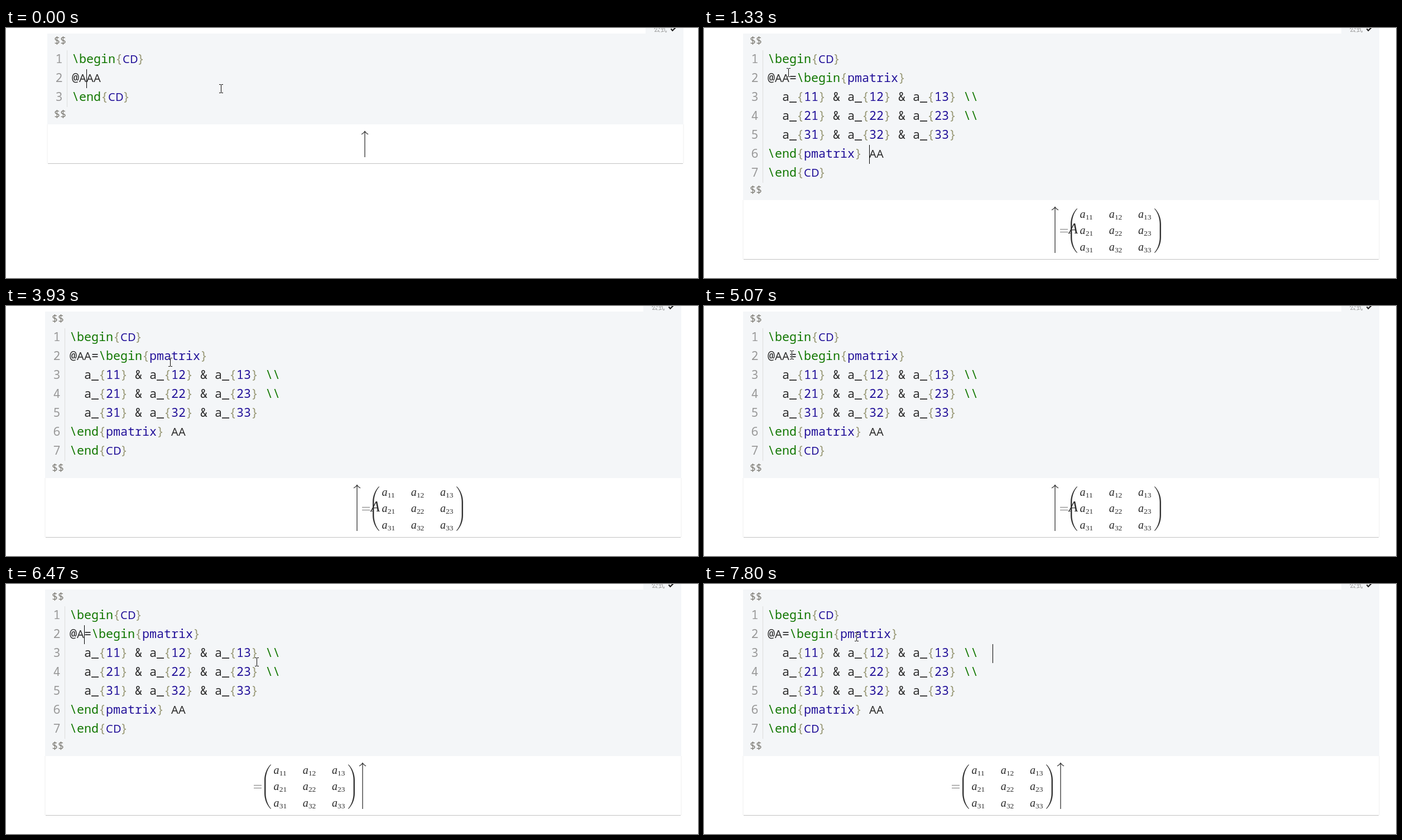
An HTML page that plays this animation: 1240x449 px, repeating every 7870 ms.

```html
<!DOCTYPE html>
<html lang="zh">
<head>
<meta charset="utf-8">
<title>Formula editor</title>
<style>
  html, body { margin: 0; width: 100%; height: 100%; overflow: hidden; background: #fff; }
  svg { display: block; }
  text { white-space: pre; fill: #2c2c2c; }
  .code { font: 21.667px "Noto Sans Mono", monospace; }
  .caps { font: 20px "Noto Sans", sans-serif; }
  .cmd { fill: #170; }
  .brace { fill: #997; }
  .arg { fill: #219; }
  .num { fill: #999; }
  .fence { font: 18.333px "Noto Sans Mono", monospace; fill: #7d7b74; }
  .tab { font: 12px "Noto Sans CJK SC", "Noto Sans CJK", sans-serif; fill: #999; }
  .var { font: italic 20px "Liberation Serif", serif; }
  .big { font: italic 27px "Liberation Serif", serif; }
  .sub { font: 13.4px "Liberation Serif", serif; }
  .line { fill: none; stroke: #333; stroke-width: 1.3; }
  #pointer { mix-blend-mode: difference; fill: #fff; }
</style>
</head>
<body>
<svg id="stage" width="1240" height="449" viewBox="0 0 1240 449"></svg>
<script>
const LOOP = 7870, TICK = 200 / 3, COL = 13, ROW = 34, LEFT = 114;
const stage = document.getElementById('stage');

function add(parent, tag, attrs, text) {
  const el = document.createElementNS('http://www.w3.org/2000/svg', tag);
  for (const key in attrs) el.setAttribute(key, attrs[key]);
  if (text) el.textContent = text;
  parent.append(el);
  return el;
}
const rect = (g, x, y, width, height, fill) => add(g, 'rect', { x, y, width, height, fill });
const label = (g, cls, x, y, text) => add(g, 'text', { class: cls, x, y }, text);

function codeLine(g, source, row) {
  const y = 63 + row * ROW;
  let col = 0, inside = false;
  label(g, 'code num', 84.5, y, String(row + 1));
  for (const token of source.match(/\\\\|\\[a-z]+|[{}]|[A-Z]+|[^\\{}A-Z]+/g)) {
    const isBrace = /[{}]/.test(token);
    if (isBrace) inside = token === '{';
    const color = isBrace ? 'brace' : token[0] === '\\' ? 'cmd' : inside ? 'arg' : '';
    const font = /[A-Z]/.test(token) ? 'caps' : 'code';
    const xs = [...token].map((_, i) => LEFT + (col + i) * COL);
    label(g, font + ' ' + color, xs.join(' '), y, token);
    col += token.length;
  }
}

function editor(shift, lines, previewHeight) {
  const g = add(stage, 'g', { transform: `translate(${shift})` });
  const split = 71 + lines.length * ROW, end = split + previewHeight;
  rect(g, 70, 10, 1140, split - 10, '#f4f6f8');
  rect(g, 1142, 0, 68, 10, '#f4f6f8');
  label(g, 'tab', 1156.5, 6.5, '公式');
  add(g, 'path', { d: 'M1187.5 1.5l2.8 3.2l6 -6', fill: 'none', stroke: '#222', 'stroke-width': 2.2 });
  label(g, 'fence', 82, 29, '$$');
  label(g, 'fence', 82, split - 12, '$$');
  rect(g, 105, 40, 1, lines.length * ROW, '#ddd');
  lines.forEach((line, i) => codeLine(g, line, i));
  rect(g, 69.5, split, 1, previewHeight, '#f0f0f0');
  rect(g, 1209.5, split, 1, previewHeight, '#f0f0f0');
  rect(g, 71, end, 1138, 1, '#c2c2c2');
  return g;
}

function arrow(g, x, top, bottom) {
  add(g, 'path', {
    class: 'line',
    d: `M${x} ${top + .5}V${bottom}M${x - 6} ${top + 6}Q${x - 2} ${top + 4} ${x} ${top + .5}Q${x + 2} ${top + 4} ${x + 6} ${top + 6}`
  });
}

function matrix(g, x) {
  const m = add(g, 'g', { transform: `translate(${x})` });
  const paren = 'M11.3 324C4 331 0 342 0 352V376C0 386 4 397 11.3 404' +
    'L12 403.3C6 397 2.4 386 2.4 376V352C2.4 342 6 331 12 324.7Z';
  add(m, 'path', { d: paren, fill: '#333' });
  add(m, 'path', { d: paren, fill: '#333', transform: 'translate(162) scale(-1 1)' });
  add(m, 'path', { d: 'M-19 361.5h14M-19 366.5h14', fill: 'none', stroke: '#777' });
  for (let r = 0; r < 3; r++) for (let c = 0; c < 3; c++) {
    const cx = 16.5 + c * 52.2, cy = 340.5 + r * 29.7;
    label(m, 'var', cx, cy, 'a');
    label(m, 'sub', cx + 10.2, cy + 3, `${r + 1}${c + 1}`);
  }
}

const withMatrix = head => [
  '\\begin{CD}', head + '=\\begin{pmatrix}',
  ...[1, 2, 3].map(r => '  ' + [1, 2, 3].map(c => `a_{${r}${c}}`).join(' & ') + (r < 3 ? ' \\\\' : '')),
  '\\end{pmatrix} AA', '\\end{CD}'
];

rect(stage, 0, 0, 1240, 449, '#fff');
const scenes = [
  editor(4, ['\\begin{CD}', '@AAA', '\\end{CD}'], 70),
  editor(0, withMatrix('@AA'), 106),
  editor(0, withMatrix('@A'), 106)
];
arrow(scenes[0], 639, 185, 232);
arrow(scenes[1], 629, 321, 404);
matrix(scenes[1], 657);
label(scenes[1], 'big', 653.5, 369, 'A');
matrix(scenes[2], 463);
arrow(scenes[2], 639, 321, 404);

const caret = rect(stage, 0, 0, 1, ROW, '#000');
const pointer = add(stage, 'path', {
  id: 'pointer',
  d: 'M-3-8h3v1h-3zM1-8h3v1h-3zM0-7h1v14h-1zM-3 7h3v1h-3zM1 7h3v1h-3z'
});

// time, scene
const sceneSteps = [[0, 0], [1330, 1], [5330, 2]];
// time, x, y; no place means hidden
const caretSteps = [
  [0, 144, 74], [270], [730, 144, 74], [1270], [1330, 296, 210], [1870], [2330, 296, 210], [2870],
  [2930, 387, 74], [3460], [4000, 387, 74], [4530], [4600, 153, 74], [5070],
  [5330, 140, 74], [5870], [6330, 140, 74], [6670, 517, 108], [7200], [7670, 517, 108]
];
// time, x, y
const pointerPath = [
  [0, 385, 109], [70, 385, 109], [870, 161, 82], [1000, 151, 80], [1670, 151, 80], [2000, 154, 97],
  [2400, 154, 97], [2470, 154, 97], [2930, 571, 76], [3340, 571, 76], [3530, 303, 101], [3870, 303, 101],
  [3930, 297, 101], [4330, 157, 88], [6200, 157, 88], [6470, 448, 140], [6600, 556, 140], [6670, 556, 134],
  [6800, 556, 134], [7330, 153, 102], [7400, 153, 102], [7800, 273, 95], [LOOP, 273, 95]
];

const stepAt = (steps, t) => steps.findLast(s => s[0] <= t);

function pointAt(path, t) {
  const i = Math.max(1, path.findIndex(p => p[0] > t));
  const [t0, x0, y0] = path[i - 1], [t1, x1, y1] = path[i];
  const k = Math.min(1, (t - t0) / (t1 - t0));
  return [x0 + (x1 - x0) * k, y0 + (y1 - y0) * k].map(Math.round);
}

function draw() {
  const now = performance.now() % LOOP;
  const t = Math.min(LOOP - 1, Math.floor((now + 4) / TICK) * TICK + 4);
  const current = stepAt(sceneSteps, t)[1];
  scenes.forEach((g, i) => g.setAttribute('visibility', i === current ? 'visible' : 'hidden'));
  const [, x, y] = stepAt(caretSteps, t);
  caret.setAttribute('visibility', x ? 'visible' : 'hidden');
  if (x) {
    caret.setAttribute('x', x);
    caret.setAttribute('y', y);
  }
  pointer.setAttribute('transform', `translate(${pointAt(pointerPath, t)})`);
  requestAnimationFrame(draw);
}
draw();
</script>
</body>
</html>
```
